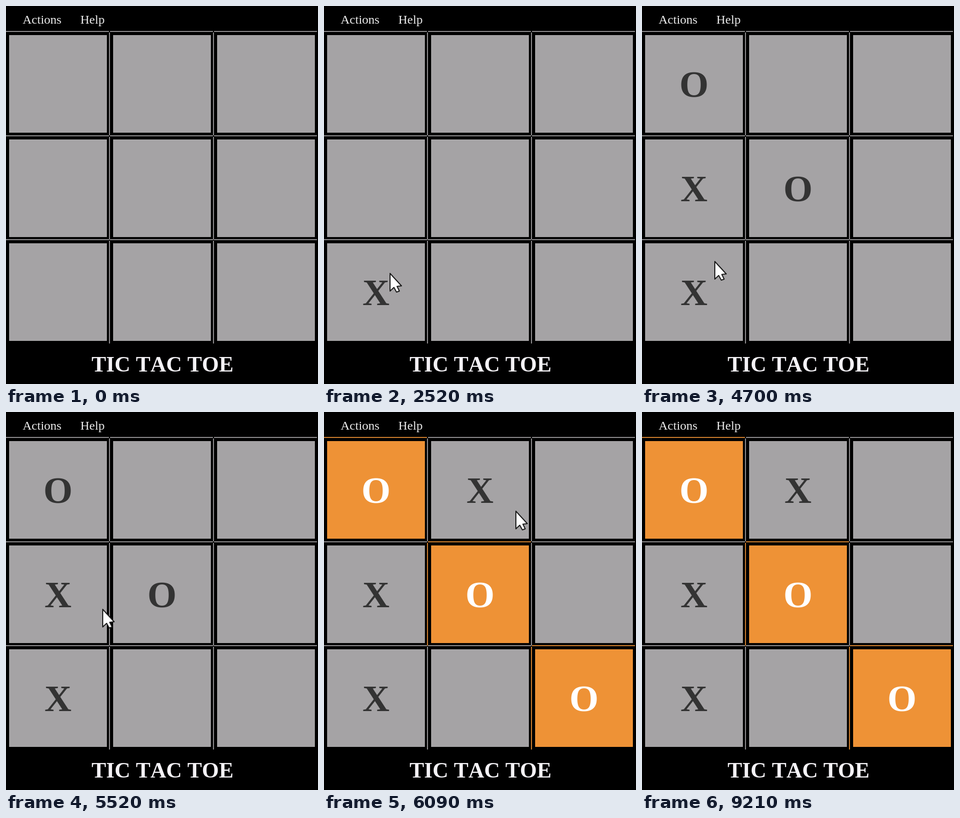
Write an HTML page with a canvas that moves like this. It is 600 by 728 pixels and loops after 9.67 s.

```html
<!DOCTYPE html>
<html lang="en">
<head>
<meta charset="utf-8">
<title>Tic Tac Toe</title>
<style>
  html, body { margin: 0; width: 100%; height: 100%; overflow: hidden; background: #000; }
  canvas { display: block; }
</style>
</head>
<body>
<canvas id="stage" width="600" height="728"></canvas>
<script>
const ctx = document.getElementById('stage').getContext('2d');
const LOOP = 9670, REPLY = 30, PITCH = 200.5;
const SERIF = '"Liberation Serif", "Times New Roman", serif';
const GREY = [165, 163, 165], ORANGE = [238, 146, 54];
const INK = [51, 51, 51], WHITE = [255, 255, 255];

// Each turn: X takes one cell, O replies at once. Cells count row by row.
const turns = [
  { at: 2520, X: 6, O: 4 },
  { at: 3940, X: 3, O: 0 },
  { at: 5970, X: 1, O: 8 }
];
const winAt = turns[2].at + REPLY;

// The pointer enters from beyond the right edge and makes eased strokes.
const entry = { x: 760, y: 343 };
const strokes = [
  { from: 1040, to: 1970, x: 126, y: 514 },
  { from: 3640, to: 3880, x: 88, y: 409 },
  { from: 4490, to: 4880, x: 179, y: 386, dip: 97 },
  { from: 5480, to: 5850, x: 368, y: 190 },
  { from: 8550, to: 8670, x: 489, y: 156 }
];

const arrow = new Path2D('M1 1V35L8.5 28L13.5 37L19 35L14.5 26L23 25Z');

const mix = (a, b, k) => a + (b - a) * k;
const progress = (t, from, to) => Math.min(1, Math.max(0, (t - from) / (to - from)));
const ease = p => p * p * (3 - 2 * p);
const blend = (a, b, k) => `rgb(${a.map((v, i) => Math.round(mix(v, b[i], k)))})`;

function text(str, x, y, font, color, align = 'left') {
  ctx.font = `${font} ${SERIF}`;
  ctx.fillStyle = color;
  ctx.textAlign = align;
  ctx.fillText(str, x, y);
}

function markAt(cell, t) {
  for (const turn of turns) {
    if (turn.X === cell && t >= turn.at) return 'X';
    if (turn.O === cell && t >= turn.at + REPLY) return 'O';
  }
  return '';
}

function drawCell(cell, t) {
  const col = cell % 3, row = Math.floor(cell / 3);
  const x = 200 * col, y = Math.round(PITCH * row);
  const won = col === row ? progress(t, winAt, winAt + 90) : 0;
  ctx.fillStyle = blend(GREY, ORANGE, won);
  ctx.fillRect(x + 6, y + 56, 188, 188);

  ctx.globalAlpha = 0.85;
  ctx.fillRect(x, y + 48, 198, 2);
  if (col) ctx.fillRect(x - 2, y + 51, 2, 198);
  ctx.globalAlpha = 1;

  text(markAt(cell, t), x + 100, y + 175, 'bold 72px', blend(INK, WHITE, won), 'center');
}

function drawPointer(t) {
  if (t >= strokes.at(-1).to) return;
  let { x, y } = entry;
  for (const s of strokes) {
    const k = ease(progress(t, s.from, s.to));
    x = mix(x, s.x, k);
    y = mix(y, s.y, k) + (s.dip || 0) * Math.sin(Math.PI * k);
  }
  ctx.save();
  ctx.translate(Math.round(x), Math.round(y));
  ctx.fillStyle = '#fff';
  ctx.strokeStyle = '#1c1c1c';
  ctx.lineWidth = 2;
  ctx.lineJoin = 'round';
  ctx.fill(arrow);
  ctx.stroke(arrow);
  ctx.restore();
}

function draw(t) {
  ctx.fillStyle = '#000';
  ctx.fillRect(0, 0, 600, 728);
  ctx.fontKerning = 'none';
  text('Actions', 32, 34, '24px', '#ececec');
  text('Help', 143, 34, '24px', '#ececec');
  text('TIC TAC TOE', 301, 704, 'bold 42px', '#f4f2f6', 'center');
  for (let cell = 0; cell < 9; cell++) drawCell(cell, t);
  drawPointer(t);
}

const start = performance.now();
function tick() {
  draw((performance.now() - start) % LOOP);
  requestAnimationFrame(tick);
}
tick();
</script>
</body>
</html>
```
